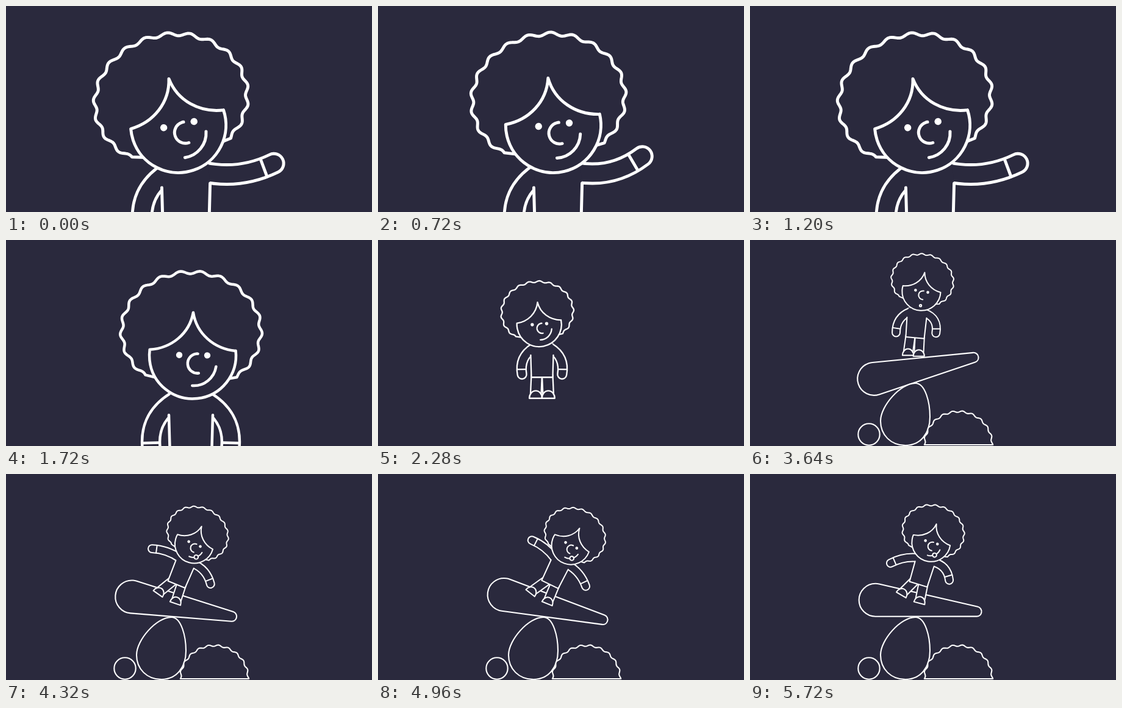
Write an HTML page with a canvas that moves like this. It is 600x338 px and loops after 5.76 s.

```html
<!DOCTYPE html>
<html lang="en">
<head>
<meta charset="utf-8">
<title>Balancing act</title>
<style>
  html, body { margin: 0; width: 100%; height: 100%; overflow: hidden; background: #2a293d; }
  canvas { display: block; width: 600px; height: 338px; }
</style>
</head>
<body>
<canvas id="stage" width="600" height="338"></canvas>
<script>
const LOOP = 5760, STEP = 40;
const INK = '#fff', BG = '#2a293d', LINE = 4.5;
const RAD = Math.PI / 180, TAU = 2 * Math.PI;
const ctx = document.getElementById('stage').getContext('2d');

// body: x, y, scale, rotation. head: x, y from the neck, rotation.
// arms: upper and fore angle of the left (mirrored), then of the right arm.
const WAVE = { body: [295, 257, 1.1, 0], head: [-11.5, -56.5, -11.5], arms: [32, 100, 12, -26] };
const NEAR = { body: [303, 250, 1, 0], head: [3, -61, .8], arms: [32, 100, 32, 100] };
const FAR = { body: [264, 185.5, .445, 0], head: [-11, -61, -5], arms: [32, 100, 32, 100] };
const HOP = { body: [274.7, 112.5, .445, 5], head: [8.5, -65, 10], arms: [27, 95, 15, 95] };
const BALANCE = { body: [290, 135, .445, 17], head: [0, -54, 16], arms: [10, 45, -5, 66] };
const TIP = { body: [303, 138, .445, 26], head: [6, -56, 27], arms: [-28, 3, 3, 45] };

const clamp = v => Math.max(0, Math.min(1, v));
const part = (t, from, to) => clamp((t - from) / (to - from));
const smooth = u => u * u * (3 - 2 * u);
const rise = (t, from, to) => (1 - part(t, from, to)) ** 3;
const mix = (a, b, u) => a + (b - a) * u;

function blend(a, b, u) {
  const list = key => a[key].map((v, i) => mix(v, b[key][i], u));
  return { body: list('body'), head: list('head'), arms: list('arms') };
}

function tiltAt(t) {
  if (t > 3900) return -.55 - 15.8 * Math.cos(TAU * (t - 3900) / 680);
  const lifted = mix(-23.7, -12.1, smooth(part(t, 3000, 3640)));
  return mix(lifted, -16.35, smooth(part(t, 3660, 3900)));
}

function wavePose(t) {
  const w = (1 - Math.cos(TAU * t / 600)) / 2;
  const { body, head: [x, y, rot], arms: [lu, lf, ru, rf] } = WAVE;
  return { body, head: [x + 13 * w, y, rot + 15 * w], arms: [lu, lf, ru - 4 * w, rf - 32 * w] };
}

function poseAt(t, tilt) {
  if (t < 1200) return wavePose(t);
  if (t < 1720) return blend(WAVE, NEAR, smooth(part(t, 1200, 1720)));
  if (t < 3000) {
    const pose = blend(NEAR, FAR, smooth(part(t, 1720, 2440)));
    pose.body[1] -= 34 * Math.sin(Math.PI * part(t, 2080, 2880));
    return pose;
  }
  if (t < 3660) return blend(FAR, HOP, smooth(part(t, 3000, 3640)));
  const lean = (tilt - 6.5) / 7.7;
  const riding = blend(BALANCE, TIP, lean < 0 ? lean * .45 : lean);
  return blend(HOP, riding, part(t, 3660, 3900) ** 2);
}

function turn(x, y, deg) {
  const c = Math.cos(deg * RAD), s = Math.sin(deg * RAD);
  return [x * c - y * s, x * s + y * c];
}

function at(x, y, deg, draw) {
  ctx.save();
  ctx.translate(x, y);
  ctx.rotate(deg * RAD);
  draw();
  ctx.restore();
}

function paint() {
  ctx.fillStyle = BG;
  ctx.fill();
  ctx.stroke();
}

function dot(x, y, r) {
  ctx.beginPath();
  ctx.arc(x, y, r, 0, TAU);
}

function frizz(cx, cy, rx, ry, amp, from, to) {
  for (let d = from; d <= to; d++) {
    const k = amp * Math.cos(21.4 * (d - 277) * RAD);
    ctx.lineTo(cx + (rx + k) * Math.cos(d * RAD), cy + (ry + k) * Math.sin(d * RAD));
  }
}

// Outlined tube: a wide ink stroke with a narrower one on top.
function tube(width, trace) {
  for (const [extra, color] of [[LINE, INK], [-LINE, BG]]) {
    ctx.beginPath();
    trace();
    ctx.lineWidth = width + extra;
    ctx.strokeStyle = color;
    ctx.stroke();
  }
  ctx.lineWidth = LINE;
  ctx.strokeStyle = INK;
}

// Right arm; the left one is drawn mirrored.
function drawArm(upper, fore) {
  const [ux, uy] = turn(56, 0, upper);
  const [fx, fy] = turn(56, 0, fore);
  const x = 26, y = 14;
  tube(29, () => {
    ctx.moveTo(x, y);
    ctx.quadraticCurveTo(x + ux, y + uy, x + ux + fx, y + uy + fy);
  });
  const u = .85, v = 1 - u;
  const cuffX = x + ux * (1 - v * v) + fx * u * u;
  const cuffY = y + uy * (1 - v * v) + fy * u * u;
  at(cuffX, cuffY, Math.atan2(mix(uy, fy, u), mix(ux, fx, u)) / RAD, () => {
    ctx.beginPath();
    ctx.moveTo(0, -14);
    ctx.lineTo(0, 14);
    ctx.stroke();
  });
}

function drawTorso(leftUpper, rightUpper) {
  const pit = a => 14 + 10 * Math.tan(a * RAD) + 14.5 / Math.cos(a * RAD);
  const sides = () => {
    ctx.lineTo(-36, pit(leftUpper));
    ctx.lineTo(-34, 108);
    ctx.lineTo(34, 108);
    ctx.lineTo(36, pit(rightUpper));
  };
  ctx.beginPath();
  ctx.moveTo(-33, 0);
  sides();
  ctx.lineTo(33, 0);
  ctx.fillStyle = BG;
  ctx.fill();
  ctx.beginPath();
  sides();
  ctx.stroke();
}

function drawLeg(hip, foot) {
  const [ux, uy] = turn(0, -8, foot.rot);
  ctx.lineCap = 'butt';
  tube(34, () => {
    ctx.moveTo(...hip);
    ctx.lineTo(foot.x + ux, foot.y + uy);
  });
  ctx.lineCap = 'round';
}

function drawShoe(foot) {
  at(foot.x, foot.y, foot.rot, () => {
    ctx.beginPath();
    ctx.ellipse(0, 0, 20.5, 24, 0, Math.PI, TAU);
    ctx.closePath();
    paint();
  });
}

function drawMouth(t) {
  if (t >= 3120 && t < 3880) {
    dot(6, 53, 3.7);
    paint();
    return;
  }
  ctx.beginPath();
  ctx.arc(2, 13, 37, 8 * RAD, 93 * RAD);
  ctx.stroke();
  if (t >= 3880) {
    dot(25, 42, 7.5);
    paint();
  }
}

function drawHead(t) {
  ctx.beginPath();
  ctx.moveTo(-58, 38);
  frizz(-3, -39, 114, 97, 2.5, 131, 409);
  ctx.lineTo(58, 38);
  paint();

  ctx.beginPath();
  ctx.arc(0, .5, 71, -7 * RAD, 187 * RAD);
  ctx.bezierCurveTo(-35, -11, -6, -35, 0, -70);
  ctx.bezierCurveTo(6, -35, 35, -11, 70.5, -8);
  ctx.closePath();
  paint();

  ctx.fillStyle = INK;
  for (const x of [-22, 24]) {
    dot(x, 0, 5.2);
    ctx.fill();
  }
  ctx.beginPath();
  ctx.arc(8, 13.5, 16, 82 * RAD, 272 * RAD);
  ctx.stroke();
  drawMouth(t);
}

function drawFigure(t, plank) {
  const { body: [x, y, s, rot], head: [hx, hy, hr], arms } = poseAt(t, plank.tilt);
  const planted = part(t, 3700, 3880);

  // Feet hang from the body in the air and stick to the plank after landing.
  const feet = [-1, 1].map(side => {
    const [ax, ay] = turn(side * 20, 175, rot);
    const [px, py] = turn(56.5 + side * 15.5, side * 5 - 8, plank.tilt);
    return {
      x: mix(ax, (plank.x + px - x) / s, planted),
      y: mix(ay, (plank.y + py - y) / s, planted),
      rot: planted * (plank.tilt + 16 - side * 8)
    };
  });

  ctx.save();
  ctx.translate(x, y);
  ctx.scale(s, s);
  ctx.lineWidth = LINE;
  feet.forEach((foot, i) => drawLeg(turn(i ? 17 : -17, 100, rot), foot));
  feet.forEach(drawShoe);
  at(0, 0, rot, () => {
    ctx.scale(-1, 1);
    drawArm(arms[0], arms[1]);
    ctx.scale(-1, 1);
    drawArm(arms[2], arms[3]);
    drawTorso(arms[0], arms[2]);
    at(hx, hy, hr - rot, () => drawHead(t));
  });
  ctx.restore();
}

function drawProps(t, plank) {
  const slip = 1 - part(t, 2920, 3160);
  ctx.lineWidth = 2.1;

  at(plank.x, plank.y, plank.tilt, () => {
    const edge = Math.acos(19 / 167);
    ctx.beginPath();
    ctx.arc(0, 0, 27, edge, TAU - edge);
    ctx.arc(167, 0, 8, -edge, edge);
    ctx.closePath();
    paint();
  });

  at(slip, 115 * rise(t, 2320, 2840), 0, () => {
    ctx.beginPath();
    ctx.moveTo(271, 235);
    ctx.bezierCurveTo(288, 235, 295, 268, 295, 290);
    ctx.bezierCurveTo(295, 318, 279, 337, 255, 337);
    ctx.bezierCurveTo(231, 337, 214, 320, 214, 297);
    ctx.bezierCurveTo(214, 272, 247, 235, 271, 235);
    paint();
  });

  dot(195 + 4 * slip, 319 + slip + 50 * rise(t, 2420, 2880), 17.7);
  paint();

  at(0, 70 * rise(t, 2320, 2800), 0, () => {
    ctx.beginPath();
    frizz(341.5, 336, 55.5, 54.5, 1.3, 180, 360);
    ctx.closePath();
    paint();
  });
}

function render(t) {
  ctx.fillStyle = BG;
  ctx.fillRect(0, 0, 600, 338);
  ctx.strokeStyle = INK;
  ctx.lineCap = 'round';
  ctx.lineJoin = 'round';
  // The plank rolls over the egg, so its thick end follows the tilt.
  const tilt = tiltAt(t);
  const plank = {
    tilt,
    x: 204.8 + .13 * tilt,
    y: 214.1 - 1.135 * tilt + 200 * rise(t, 2320, 2860)
  };
  if (t > 2320) drawProps(t, plank);
  drawFigure(t, plank);
}

const start = performance.now();
function tick() {
  const t = (performance.now() - start) % LOOP;
  render(Math.floor(t / STEP) * STEP);
  requestAnimationFrame(tick);
}
tick();
</script>
</body>
</html>
```
